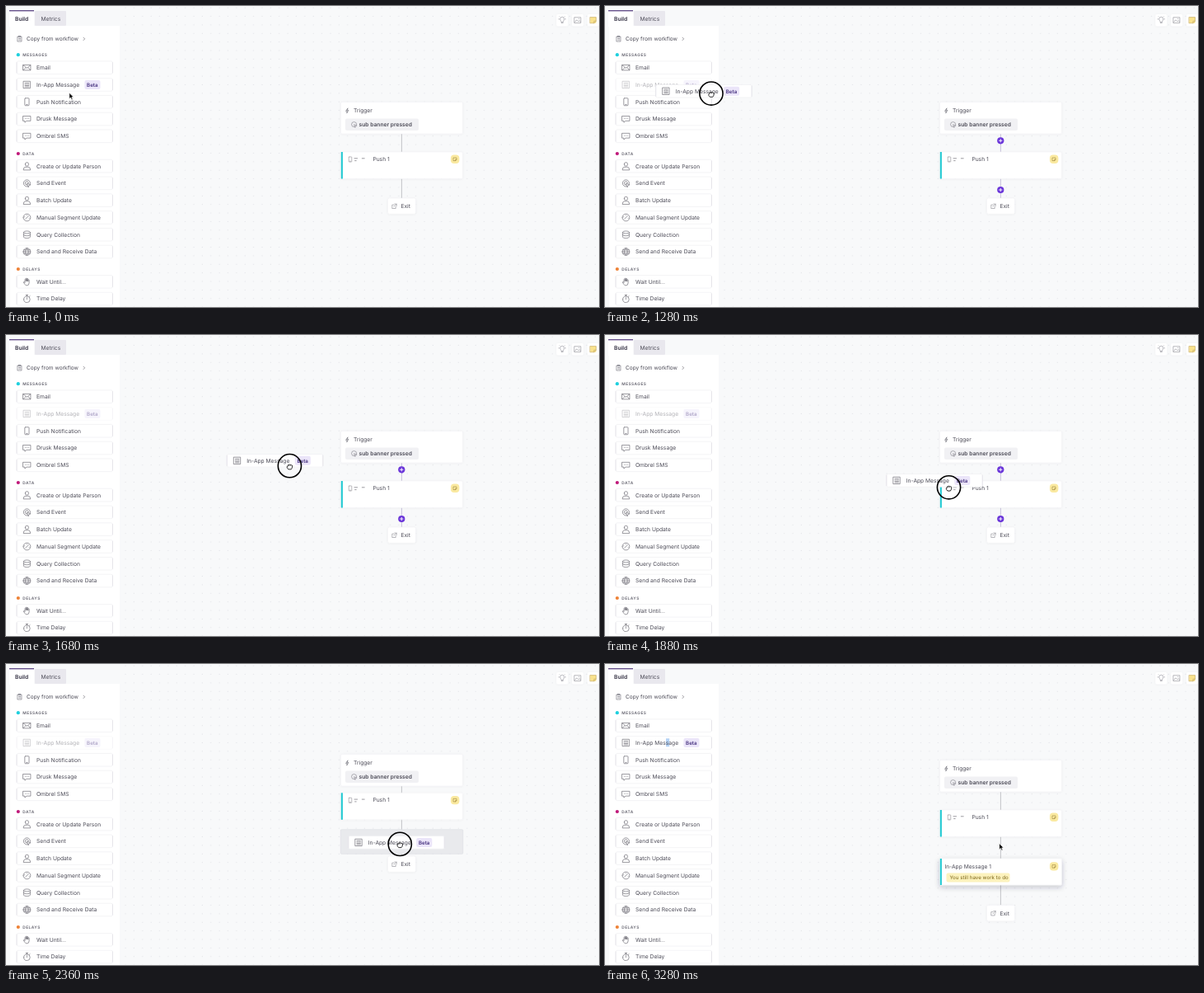
Recreate the animation shown at these times as an HTML page. Size 720 px wide and 365 px high, loop 3.8 s.

```html
<!DOCTYPE html>
<html lang="en">
<head>
<meta charset="utf-8">
<title>Workflow builder</title>
<style>
  html, body { margin: 0; width: 100%; height: 100%; overflow: hidden; background: #f8f9fa; }
  svg { display: block; width: 100vw; height: 100vh; }
  text { font-family: Inter, "Open Sans", sans-serif; font-size: 6.7px; fill: #4b4a56; text-rendering: geometricPrecision; }
  .semi { font-weight: 600; }
  .head { font-size: 4.8px; font-weight: 600; letter-spacing: .45px; fill: #62616d; }
  .icon { fill: none; stroke: #66656f; stroke-width: .65; stroke-linecap: round; stroke-linejoin: round; }
  .pale { stroke: #92919a; }
  .box { fill: #fff; stroke: #f0f0f3; stroke-width: .7; }
  .side { fill: none; stroke: #e2e1e8; stroke-width: .8; }
  .card { fill: #fff; stroke: #f2f2f5; stroke-width: .6; }
</style>
</head>
<body>
<svg id="stage" viewBox="0 0 720 365">
  <defs>
    <pattern id="dots" x="140" y="-3" width="10.37" height="10.37" patternUnits="userSpaceOnUse">
      <circle cx="5" cy="5" r=".6" fill="#dcdde3"/>
    </pattern>
    <filter id="soft" x="-10%" y="-30%" width="120%" height="170%">
      <feDropShadow dx="0" dy=".4" stdDeviation=".8" flood-color="#202040" flood-opacity=".05"/>
    </filter>
    <filter id="lift" x="-10%" y="-30%" width="120%" height="190%">
      <feDropShadow dx="0" dy="2.5" stdDeviation="3.2" flood-color="#202040" flood-opacity=".24"/>
    </filter>
  </defs>
</svg>
<script>
const LOOP = 3800, STEP = 40, PRESS = 1040, DRAG = 1120, DROP = 2720;
const stage = document.getElementById('stage');
const $ = id => document.getElementById(id);

const label = (x, y, s, cls = '', extra = '') =>
  `<text x="${x}" y="${y + 2.4}" class="${cls}" ${extra}>${s}</text>`;
const rect = (x, y, w, h, r, attrs) =>
  `<rect x="${x}" y="${y}" width="${w}" height="${h}" rx="${r}" ${attrs}/>`;
const icon = (x, y, name, scale = 1, cls = '', style = '') =>
  `<path class="icon ${cls}" style="${style}" transform="translate(${x} ${y}) scale(${scale})" d="${icons[name]}"/>`;
const ring = r => `M${-r} 0a${r} ${r} 0 1 0 ${2 * r} 0a${r} ${r} 0 1 0 ${-2 * r} 0`;

const click = 'M4.1 .5A4.1 4.1 0 1 0 .5 4.1M.4 .4L4.6 1.9L2.6 2.6L1.9 4.6Z';
const icons = {
  click,
  event: click + 'M2.1 0A2.1 2.1 0 1 0 0 2.1',
  mail: 'M-4.5-3.2H4.5V3.2H-4.5ZM-4.5-3L0 .7L4.5-3M-4.3 3L-1.2-.2M4.3 3L1.2-.2',
  list: 'M-4-4.2H4V4.2H-4ZM-2.2-2.2H2.2M-2.2-.5H-.8M.4-.5H2.2M-2.2 1H2.2M-2.2 2.5H2.2',
  phone: 'M-1.8-4.5H1.8Q2.6-4.5 2.6-3.7V3.7Q2.6 4.5 1.8 4.5H-1.8Q-2.6 4.5-2.6 3.7V-3.7Q-2.6-4.5-1.8-4.5M-.7 3.3H.7',
  chat: 'M-4.5-3.5H4.5V2.3H-.5L-2.5 4.2V2.3H-4.5ZM-2.1-.6H-1.9M-.1-.6H.1M1.9-.6H2.1',
  person: 'M-2.1-2.2a2.1 2.3 0 1 0 4.2 0a2.1 2.3 0 1 0-4.2 0M-4.3 4.4Q-4.3 1.2-1.4 1Q0 1.8 1.4 1Q4.3 1.2 4.3 4.4Z',
  gauge: ring(4.4) + 'M-1.8 1.8L2-2M-2.8-.8V-.7M0-3V-2.9M2.8 .8V.9',
  data: 'M-4-2.8a4 1.5 0 1 0 8 0a4 1.5 0 1 0-8 0V2.8A4 1.5 0 0 0 4 2.8V-2.8M-4 0A4 1.5 0 0 0 4 0',
  globe: ring(4.4) + 'M-4.4 0H4.4M0-4.4Q-4 0 0 4.4Q4 0 0-4.4M-3.7-2.2H3.7M-3.7 2.2H3.7',
  hand: 'M-2.4 .8V-2.8Q-1.8-3.8-1.2-2.8V-.5V-3.8Q-.5-4.8 .1-3.8V-.5V-3.6Q.8-4.4 1.4-3.4V-.2V-2.4Q2.2-3 2.7-2V1.6Q2.5 4.6 0 4.6Q-1.8 4.6-2.6 3L-4.2 .6Q-3.6-.4-2.4 .8',
  watch: 'M-3.8 .7a3.8 3.8 0 1 0 7.6 0a3.8 3.8 0 1 0-7.6 0M-1.2-4.6H1.2M0-4.6V-3.1M0 .7V-1.4M3-2.8L3.7-3.5',
  clip: 'M-2.6-3H2.6V3.6H-2.6ZM-1.1-3.8H1.1V-2.3H-1.1ZM-1.2-.3H1.2M-1.2 1.5H1.2',
  bolt: 'M.6-3L-1.8 .5H0L-.6 3.2L1.8-.7H0Z',
  link: 'M-.4-1.8H-2.6V2.6H1.8V.4M.4-2.8H2.8V-.4M2.8-2.8L-.4 .4',
  bulb: 'M-1.2 2Q-1.2 1-2 .2A2.5 2.5 0 1 1 2 .2Q1.2 1 1.2 2ZM-1 3.4H1M-4.3-1.3H-3.7M3.7-1.3H4.3M-3-4.4L-2.6-4M3-4.4L2.6-4',
  image: 'M-3.8-3.4H3.8V3.4H-3.8ZM-3.6 2.2L-1.2-.4L.8 1.6L2 .5L3.6 2M1.4-1.6H1.8',
  note: 'M-3.6-3.6H3.6V1L1 3.6H-3.6ZM3.6 1H1V3.6'
};

const beta = (x, y) =>
  rect(x, y - 5.5, 19, 11, 2, 'fill="#ebe5f9"') + label(x + 2.6, y, 'Beta', 'semi', 'style="font-size:6.2px;fill:#46327f"');

const row = (y, name, text, extra = '') =>
  rect(13, y - 7.8, 116.5, 15.6, 2, 'class="box"') +
  `<path class="side" d="M13 ${y - 6.6}v13.2M129.5 ${y - 6.6}v13.2"/>` +
  icon(25.4, y, name) + extra + label(37, y, text);

const section = (y, color, title, first, items) =>
  `<circle cx="14.8" cy="${y}" r="2.1" fill="${color}"/>` +
  `<text class="head" x="20.3" y="${y + 1.8}">${title}</text>` +
  items.map(([name, text], i) => {
    const cy = first + i * 20.78;
    return text === 'In-App Message'
      ? `<g id="home">${row(cy, name, text, rect(74, cy - 5.2, 4.2, 10, 0, 'id="mark" fill="#b5d3f6"'))}${beta(95.5, cy)}</g>`
      : row(cy, name, text);
  }).join('');

const sidebar =
  rect(5, 24, 133, 345, 0, 'fill="#fff"') +
  rect(35, 6, 38, 18, 1, 'fill="#e9e8ee"') +
  rect(4, 5, 30, 20, 0, 'fill="#fff"') + rect(4, 5, 30, 1.4, 0, 'fill="#67528c"') +
  label(11.1, 15.4, 'Build', 'semi', 'style="fill:#2d2a3d"') + label(42.5, 15.4, 'Metrics') +
  icon(16.6, 39.8, 'clip', .9) + label(25, 39.8, 'Copy from workflow', '', 'style="font-size:6.55px"') +
  '<path class="icon" d="M94 38.2L95.7 39.9L94 41.6"/>' +
  section(59.2, '#1fd0de', 'MESSAGES', 74.7, [['mail', 'Email'], ['list', 'In-App Message'],
    ['phone', 'Push Notification'], ['chat', 'Drusk Message'], ['chat', 'Ombrel SMS']]) +
  section(179, '#c0187a', 'DATA', 194.1, [['person', 'Create or Update Person'], ['event', 'Send Event'],
    ['person', 'Batch Update'], ['gauge', 'Manual Segment Update'], ['data', 'Query Collection'],
    ['globe', 'Send and Receive Data']]) +
  section(319, '#ee8237', 'DELAYS', 334.3, [['hand', 'Wait Until...'], ['watch', 'Time Delay']]);

const tools = ['bulb', 'image', 'note'].map((name, i) => {
  const x = 675.3 + i * 18.8;
  const note = name === 'note';
  return rect(x - 7, 10, 14, 14.5, 2, 'fill="#fff" filter="url(#soft)"') +
    (note ? rect(x - 3.6, 13.6, 7.2, 7.2, 0, 'fill="#f9e28c"') : '') +
    icon(x, 17.2, name, 1, 'pale', note ? 'stroke:#c4ab62' : '');
}).join('');

const badge = y => rect(540, y - 5, 10.4, 10.4, 4, 'fill="#fae9a0"') +
  icon(545.2, y + .2, 'note', .5, '', 'stroke:#8a7024;stroke-width:1');
const card = (y, h, filter) => rect(406.5, y, 148, h, 1.5, `class="card" filter="url(#${filter})"`);
const bar = (y, h) => rect(406.8, y, 2.1, h, 0, 'fill="#25cad3"');

const trigger = card(116.5, 38.5, 'soft') + icon(414.3, 127, 'bolt', .95) + label(422, 126.8, 'Trigger') +
  rect(412, 136.5, 89, 14.5, 2, 'fill="#f1f1f4"') + icon(422.6, 143.6, 'click', .75) +
  label(428.6, 143.7, 'sub banner pressed', 'semi');
const push = card(177, 32.5, 'soft') + bar(177, 32.5) + icon(418, 186, 'phone', .68) +
  '<path class="icon" d="M423 184.8H426.6M423.6 187.6H425.2M432.3 184.8H435.2"/>' +
  label(445.4, 185.7, 'Push 1') + badge(185.6);
const exit = rect(463.5, 233, 34, 19.2, 2, 'class="card" filter="url(#soft)"') +
  icon(471.4, 242.9, 'link', 1, 'pale') + label(479.4, 242.8, 'Exit');
const added = card(236, 32, 'lift') + bar(236, 32) + label(412.4, 245.2, 'In-App Message 1') + badge(245.2) +
  rect(414.5, 253.5, 77, 11, 2, 'fill="#fcf2bd"') +
  label(418.4, 259, 'You still have work to do', '', 'style="font-size:6.2px;fill:#7a6417"');
const plus = y => `<circle cx="480.3" cy="${y}" r="4.1" fill="#6a35d9"/>` +
  `<path d="M478.2 ${y}h4.2M480.3 ${y - 2.1}v4.2" stroke="#fff" stroke-width=".9"/>`;

const ink = 'fill="#fff" stroke="#000" stroke-width=".8" stroke-linejoin="round"';
const pointer =
  '<path id="arrow" d="M0 0V7.4L1.7 5.9L3 8.7L4.3 8.1L3.1 5.4H5.3Z" fill="#000" stroke="#fff" stroke-width=".7"/>' +
  `<path id="open" transform="scale(.9)" d="${icons.hand}" ${ink}/>` +
  `<g id="grab"><path transform="translate(0 1)" d="M-2.3-1.6Q-1.6-3-.8-2.1Q0-3.2 .8-2.1Q1.7-2.9 2.3-1.8Q3.4-2 3.2-.6Q3.2 2 1.8 3.2H-1.6Q-3.6 1.2-3.3 .2Q-3.1-.6-2.3-.2ZM-.8-2V-1M.8-2V-1" ${ink}/>` +
  '<circle r="14.1" fill="none" stroke="#000" stroke-width="1.6"/></g>';

stage.insertAdjacentHTML('beforeend',
  rect(0, 0, 720, 365, 0, 'fill="#f8f9fa"') + rect(139, 0, 581, 365, 0, 'fill="url(#dots)"') +
  sidebar + tools +
  '<path id="wire" stroke-width="1" fill="none"/>' +
  `<g id="plus">${plus(163.3)}${plus(223)}</g>` +
  rect(406.3, 200.8, 148.5, 29.5, 1, 'id="slot" fill="#e9eaed" stroke="#dfe0e4" stroke-width=".7"') +
  `<g id="trigger">${trigger}</g><g id="push">${push}</g><g id="exit">${exit}</g><g id="added">${added}</g>` +
  `<g id="drag">${row(95.4, 'list', 'In-App Message')}${beta(95.5, 95.4)}</g>` +
  `<g id="pointer">${pointer}</g>`);

// Smooth path through [time, x, y] points, never overshooting them.
function along(keys, t) {
  const n = keys.length;
  if (t <= keys[0][0]) return keys[0].slice(1);
  if (t >= keys[n - 1][0]) return keys[n - 1].slice(1);
  const i = keys.findIndex(k => k[0] > t) - 1;
  const dt = keys[i + 1][0] - keys[i][0], u = (t - keys[i][0]) / dt;
  return [1, 2].map(c => {
    const sec = j => (keys[j + 1][c] - keys[j][c]) / (keys[j + 1][0] - keys[j][0]);
    const slope = j => {
      if (j === 0 || j === n - 1) return 0;
      const a = sec(j - 1), b = sec(j);
      return a * b > 0 ? 2 * a * b / (a + b) : 0;
    };
    const a = keys[i][c], b = keys[i + 1][c], s = u * u * (3 - 2 * u);
    return a + (b - a) * s + dt * u * (1 - u) * (slope(i) * (1 - u) - slope(i + 1) * u);
  });
}

const handPath = [[440, 76.8, 105.2], [640, 75.5, 97.4], [1080, 75.5, 97.4], [1480, 232.6, 125],
  [1560, 288, 141], [1880, 417.5, 184.8], [2120, 475.5, 217], [2320, 478.3, 218.4]];
const cardPath = [[1080, 0, 0], [1480, 144.8, 25.2], [1560, 200, 41],
  [1880, 328.8, 81], [2120, 396, 118.5], [2320, 402.8, 121]];

const ramp = (t, a, b) => Math.min(1, Math.max(0, (t - a) / (b - a)));
const ease = u => u < .5 ? 4 * u ** 3 : 1 - 4 * (1 - u) ** 3;
const show = (id, on) => $(id).setAttribute('visibility', on ? 'visible' : 'hidden');
const move = (id, x, y) => $(id).setAttribute('transform', `translate(${x} ${y})`);

function draw(ms) {
  const t = Math.floor(ms / STEP) * STEP;
  const held = t >= PRESS && t < DROP, dragging = t >= DRAG && t < DROP, dropped = t >= DROP;
  const gap = ease(ramp(t, 1960, 2120)), settle = ramp(t, 2765, 3040), grow = ease(settle);
  const shift = gap * (1 - grow);

  move('trigger', 0, -7 * shift);
  move('push', 0, -20.7 * shift);
  move('exit', 0, 59.5 * grow);
  $('added').setAttribute('opacity', settle);
  show('added', dropped);
  show('slot', gap > 0 && !dropped);

  const adding = dragging && gap === 0;
  show('plus', adding);
  $('wire').setAttribute('d', `M480.4 140V${dropped ? 292.5 : 233}`);
  $('wire').setAttribute('stroke', adding ? '#c9c2dc' : '#c3c4c9');

  $('home').setAttribute('opacity', dragging ? .42 : 1);
  show('mark', dropped);
  show('drag', dragging);
  move('drag', ...along(cardPath, t));

  const [x, y] = along(handPath, t);
  const hover = t >= 560 && t < PRESS;
  show('grab', held);
  show('open', hover);
  show('arrow', !held && !hover);
  move('pointer', x + (dropped ? .4 : 0), y - (dropped ? .9 : 0));
}

const start = performance.now();
function tick() {
  draw((performance.now() - start) % LOOP);
  requestAnimationFrame(tick);
}
tick();
</script>
</body>
</html>
```
